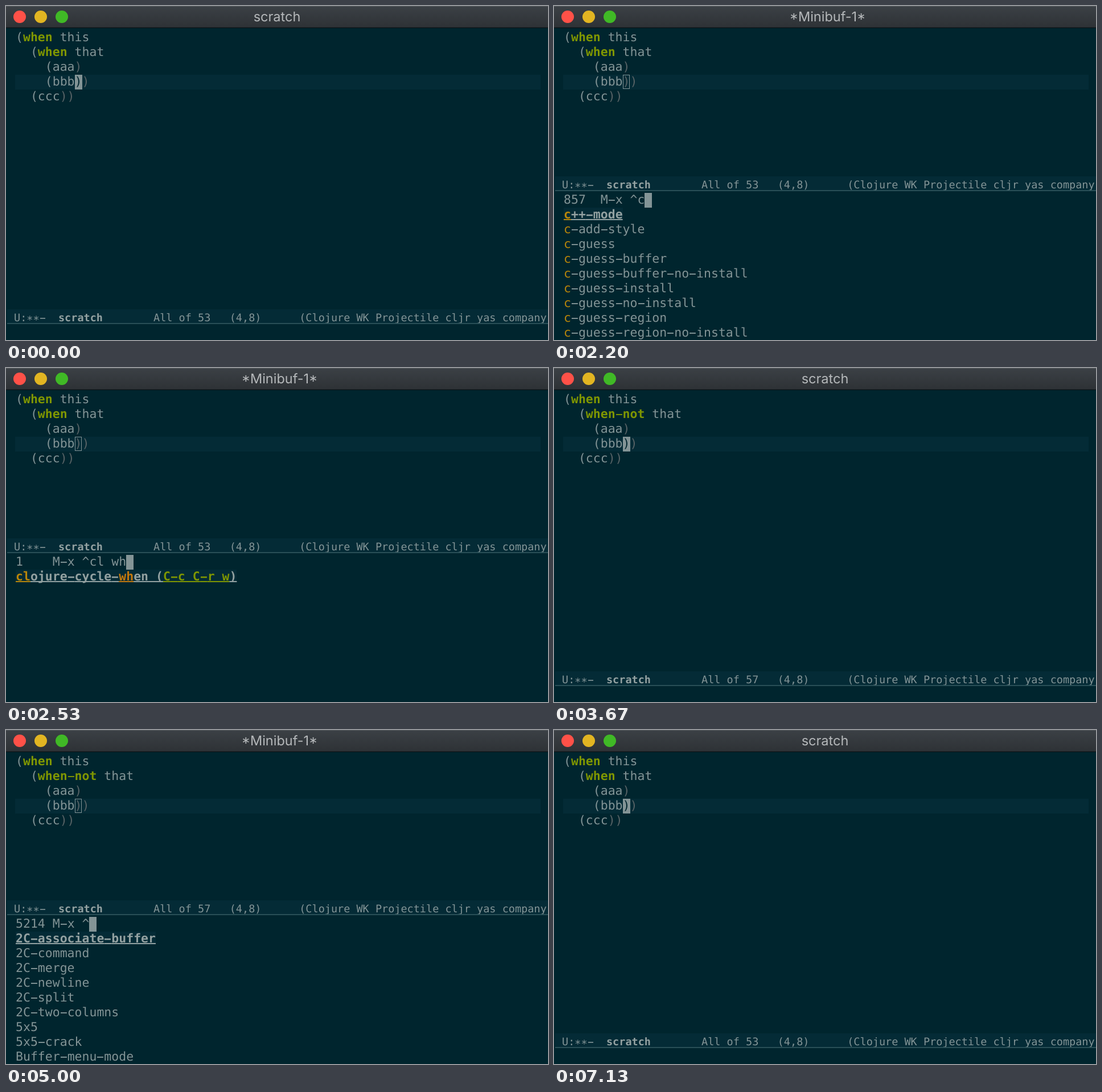
An HTML page for the animation above (7540 ms loop, 952x588 px).

```html
<!DOCTYPE html>
<html lang="en">
<head>
<meta charset="utf-8">
<title>scratch</title>
<style>
  html, body { margin: 0; width: 952px; height: 588px; overflow: hidden; background: #00252e; }
  #stage {
    position: relative; width: 952px; height: 588px; overflow: hidden; color: #839496;
    font: 21.5px/26px "DejaVu Sans Mono", monospace;
    text-rendering: geometricPrecision; font-variant-ligatures: none;
  }
  #stage div { position: absolute; white-space: pre; }
  #stage .bar {
    left: 0; top: 0; width: 952px; height: 38px; box-sizing: border-box;
    background: linear-gradient(#3b4045, #2e3236);
    border-top: 1px solid #55595d; border-bottom: 1px solid #24282b;
    box-shadow: 0 1px #071317;
  }
  #stage .light { top: 7.5px; width: 22px; height: 22px; border-radius: 50%; }
  #title {
    top: 0; width: 300px; text-align: center; color: #b5b8ba;
    font: 23.5px/38px Inter, Roboto, sans-serif;
  }
  #stage .line { left: 16px; top: 121px; width: 923px; height: 25.5px; background: #042b36; }
  #stage .mode {
    left: 2px; width: 950px; height: 24px; overflow: hidden; background: #042b36;
    border-bottom: 2px solid #294f57; font-size: 18.5px; line-height: 32px; text-indent: 12px;
  }
  #stage .box { width: 13px; height: 25.5px; background: #839496; }
  #stage .hollow { width: 12px; height: 25px; box-sizing: border-box; border: 1.5px solid #839496; }
  .kw, .key { color: #7f9600; font-weight: bold; }
  .dim { color: #586366; }
  .under { color: #00252e; }
  .strong { color: #93a1a1; font-weight: bold; }
  .m1 { color: #b98609; }
  .m2 { color: #c4780c; }
  .pick { font-weight: bold; color: #93a1a1; background: #042b36; height: 23px; }
  .pick span {
    text-decoration: underline; text-decoration-thickness: 2px;
    text-underline-offset: 1px; text-decoration-skip-ink: none;
  }
  /* wide hyphen and mid-height asterisk */
  i {
    font-style: normal; -webkit-text-fill-color: transparent;
    background: linear-gradient(currentColor, currentColor) 50% 54% / 84% .09em no-repeat;
  }
  .strong i, .pick i { background-size: 84% .12em; }
  s { text-decoration: none; position: relative; top: .2em; }
</style>
</head>
<body>
<div id="stage">
  <div class="bar"></div>
  <div class="light" style="left:13px;background:#ff5148"></div>
  <div class="light" style="left:50px;background:#e2b522"></div>
  <div class="light" style="left:87px;background:#40b926"></div>
  <div id="title"></div>
  <div class="line"></div>
  <div id="view" style="left:0;top:0"></div>
</div>
<script>
const LOOP = 7540, LEFT = 17, ROW = 26, CELL = 21.5 * 1233 / 2048;

// time, minibuffer input (null = closed), inner keyword
const STEPS = [
  [0, null, "when"],
  [2000, "", "when"], [2200, "c", "when"], [2270, "cl", "when"], [2400, "cl ", "when"],
  [2470, "cl w", "when"], [2530, "cl wh", "when"], [2600, "cl whe", "when"], [2730, "cl when", "when"],
  [3670, null, "when-not"],
  [4930, "", "when-not"], [5070, "c", "when-not"], [5130, "cl", "when-not"], [5200, "cl ", "when-not"],
  [5270, "cl w", "when-not"], [5330, "cl wh", "when-not"], [5470, "cl whe", "when-not"], [5600, "cl when", "when-not"],
  [6270, null, "when"]
];

const CYCLE = "clojure-cycle-when";
const words = (prefix, list) => list.split(" ").map(w => prefix + w);
const ALL_CL = ["clean-buffer-list", "clear-image-cache", "clear-rectangle",
  ...words("cljr-add-", "declaration import-to-ns missing-libspec project-dependency require-to-ns stubs")];
const MATCHES = {
  "": [5214, [...words("2C-", "associate-buffer command merge newline split two-columns"), "5x5", "5x5-crack", "Buffer-menu-mode"]],
  "c": [857, ["c++-mode", "c-add-style", "c-guess",
    ...words("c-guess-", "buffer buffer-no-install install no-install region region-no-install")]],
  "cl": [206, ALL_CL],
  "cl ": [206, ALL_CL],
  "cl w": [6, ["cljr-show-changelog", "cljr-unwind", "cljr-unwind-all", CYCLE, "clojure-unwind", "clojure-unwind-all"]]
};

const title = document.getElementById("title");
const view = document.getElementById("view");

const glyphs = text => text.replace(/-/g, "<i>-</i>").replace(/\*/g, "<s>*</s>");
const span = (text, cls = "") => text && `<span class="${cls}">${glyphs(text)}</span>`;
const place = (x, y, html, cls = "") => `<div class="${cls}" style="left:${x}px;top:${y}px">${html}</div>`;
const row = (y, html, cls) => place(LEFT, y, html, cls);

function buffer(keyword, active) {
  const lines = [
    span("(") + span("when", "kw") + span(" this"),
    span("  (") + span(keyword, "kw") + span(" that"),
    span("    (aaa") + span(")", "dim"),
    span("    (bbb") + span(")", active ? "under" : "dim") + span(")", "dim"),
    span("  (ccc") + span("))", "dim")
  ];
  const cursor = place(LEFT + 8 * CELL, 121, "", active ? "box" : "hollow");
  return cursor + lines.map((html, n) => row(43 + n * ROW, html)).join("");
}

function modeLine(y, size) {
  const html = span("U:**-  ") + span("scratch", "strong") +
    span(`        All of ${size}   (4,8)      (Clojure WK Projectile cljr yas company`);
  return place(2, y, html, "mode");
}

function candidate(name, input) {
  const [head, tail = ""] = input.split(" ");
  const from = head.length;
  const at = tail ? name.indexOf(tail, from) : from;
  const end = at + tail.length;
  return span(name.slice(0, from), "m1") + span(name.slice(from, at)) +
    span(name.slice(at, end), "m2") + span(name.slice(end)) +
    (name === CYCLE ? span(" (") + span("C-c C-r w", "key") + span(")") : "");
}

function minibuffer(input) {
  const [count, names] = MATCHES[input] || [1, [CYCLE]];
  const prompt = String(count).padEnd(5) + "M-x ^" + input;
  return row(329, span(prompt)) + place(LEFT + prompt.length * CELL, 329, "", "box") +
    names.map((name, n) => row(355 + n * ROW, candidate(name, input), n ? "" : "pick")).join("");
}

function draw([, input, keyword]) {
  const idle = input === null;
  title.textContent = idle ? "scratch" : "*Minibuf-1*";
  title.style.left = (idle ? 326 : 330.5) + "px";
  view.innerHTML = buffer(keyword, idle) +
    modeLine(idle ? 534 : 300, 49 + keyword.length) +
    (idle ? "" : minibuffer(input));
}

let shown;
const start = performance.now();
function tick() {
  const t = (performance.now() - start) % LOOP;
  const step = STEPS.findLast(s => s[0] <= t);
  if (step !== shown) draw(shown = step);
  requestAnimationFrame(tick);
}
tick();
</script>
</body>
</html>
```
